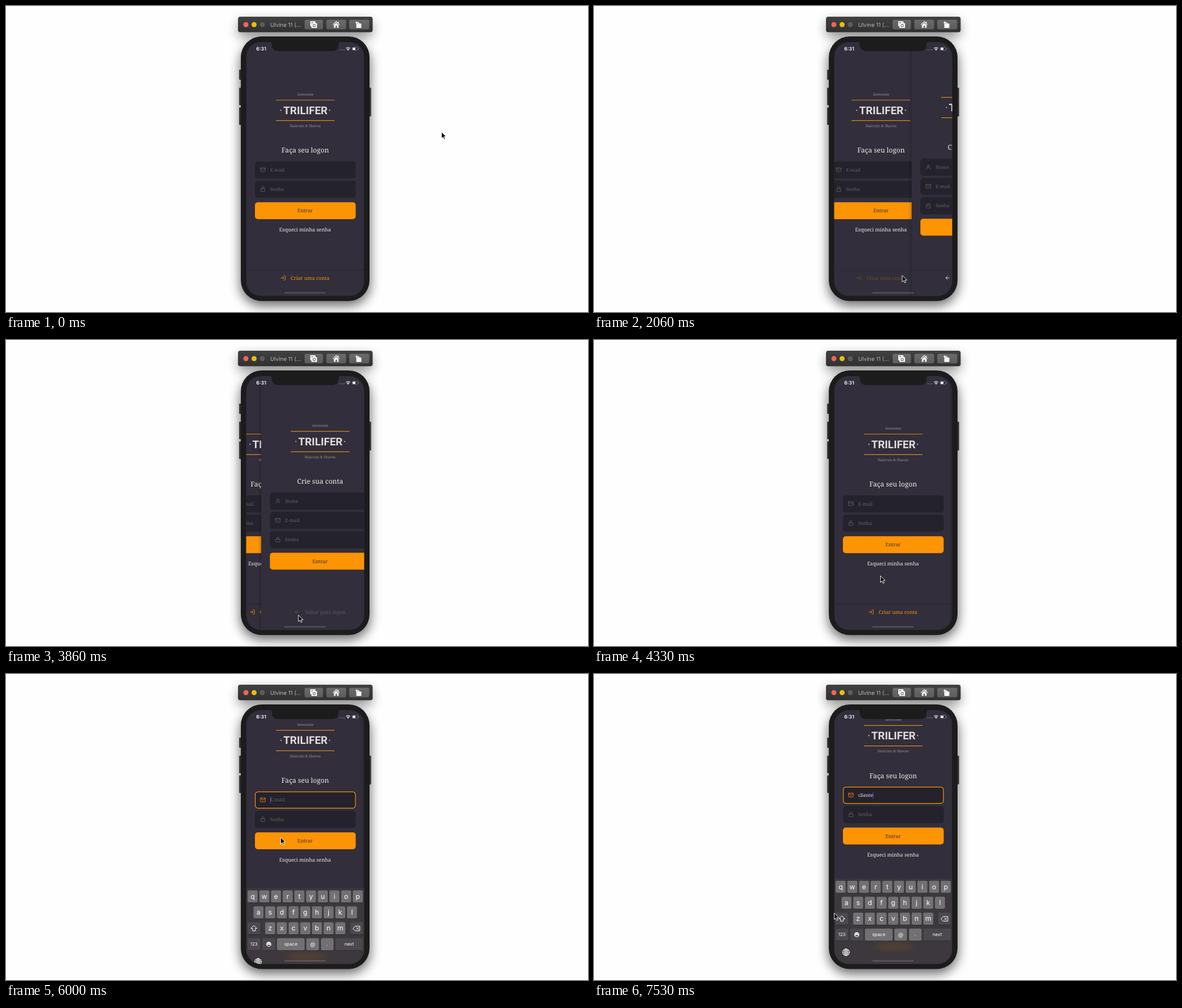
An HTML page for the animation above (8000 ms loop, 1031x543 px).

```html
<!DOCTYPE html>
<html lang="pt-BR">
<head>
<meta charset="utf-8">
<title>App logon</title>
<style>
  html, body { margin: 0; width: 100%; height: 100%; overflow: hidden; background: #fefefe; }
  svg { display: block; width: 1031px; height: 543px; }
  text { text-rendering: geometricPrecision; white-space: pre; }
  .serif { font-family: "Noto Serif", serif; }
  .sans { font-family: Inter, Roboto, sans-serif; }
  .mid { text-anchor: middle; }
  .title { font-size: 12.1px; font-weight: 500; fill: #f4ede8; }
  .tag { font-size: 6.35px; fill: #98949a; }
  .brand { font: 700 19px Roboto, sans-serif; fill: #e2dddb; }
  .hint { font-size: 8.3px; fill: #666360; }
  .typed { font-size: 8.2px; fill: #f4ede8; }
  .action { font-size: 8.7px; font-weight: 500; fill: #312e38; }
  .icon { fill: none; stroke: #666360; stroke-width: 2; stroke-linecap: round; stroke-linejoin: round; }
  .line { fill: none; stroke: #fff; stroke-width: 1; stroke-linejoin: round; stroke-linecap: round; }
  .focus .icon { stroke: #fd9404; }
  .focus .box { stroke: #fd9404; }
  .box { fill: #24222c; stroke: #24222c; stroke-width: 1.2; }
</style>
</head>
<body>
<svg viewBox="0 0 1031 543" xmlns="http://www.w3.org/2000/svg">
  <defs>
    <clipPath id="glass"><rect x="425.5" y="64" width="209" height="450.5" rx="26"/></clipPath>
    <clipPath id="safe"><rect x="425" y="79.5" width="210" height="389"/></clipPath>
    <filter id="soft" x="-30%" y="-30%" width="160%" height="160%"><feGaussianBlur stdDeviation="10"/></filter>
    <filter id="haze" x="-30%" y="-100%" width="160%" height="300%"><feGaussianBlur stdDeviation="6"/></filter>
    <linearGradient id="bar" x2="0" y2="1"><stop stop-color="#414142"/><stop offset="1" stop-color="#303031"/></linearGradient>
    <linearGradient id="btn" x2="0" y2="1"><stop stop-color="#6b6b6c"/><stop offset="1" stop-color="#5c5c5d"/></linearGradient>
    <linearGradient id="edge"><stop stop-opacity="0"/><stop offset="1" stop-opacity=".16"/></linearGradient>
    <g id="mail"><rect x="2" y="4" width="20" height="16" rx="2"/><path d="M22 6 12 13 2 6"/></g>
    <g id="lock"><rect x="3" y="11" width="18" height="11" rx="2"/><path d="M7 11V7a5 5 0 0 1 10 0v4"/></g>
    <g id="user"><path d="M20 21v-2a4 4 0 0 0-4-4H8a4 4 0 0 0-4 4v2"/><circle cx="12" cy="7" r="4"/></g>
    <g id="enter"><path d="M15 3h4a2 2 0 0 1 2 2v14a2 2 0 0 1-2 2h-4M10 17l5-5-5-5M15 12H3"/></g>
    <g id="back"><path d="M19 12H5M12 19l-7-7 7-7"/></g>
  </defs>

  <rect width="1031" height="543" fill="#fefefe"/>
  <g filter="url(#soft)" opacity=".58">
    <rect x="412" y="27" width="236" height="28" rx="4" opacity=".75"/>
    <rect x="415" y="64" width="230" height="468" rx="38"/>
  </g>

  <rect x="411" y="19" width="238.5" height="27.5" rx="4" fill="url(#bar)"/>
  <circle cx="425" cy="33" r="4.5" fill="#fc605b"/>
  <circle cx="439.5" cy="33" r="4.5" fill="#e5c009"/>
  <circle cx="454" cy="33" r="4.5" fill="#5c5c5e"/>
  <text class="sans" x="468" y="36.6" font-size="9.8" fill="#b9b9ba">Ulvine 11 (...</text>
  <g fill="url(#btn)">
    <rect x="529" y="24.5" width="32.5" height="17" rx="3"/>
    <rect x="567.5" y="24.5" width="35" height="17" rx="3"/>
    <rect x="608" y="24.5" width="35.5" height="17" rx="3"/>
  </g>
  <g fill="#f5f5f5">
    <path d="M539 27h9v2h-7v7h-2z"/>
    <path d="M541 30.5h2l1-1.5h4l1 1.5h2V39h-10z"/>
    <circle cx="546" cy="34.7" r="2.6" fill="#646465"/><circle cx="546" cy="34.7" r="1.6"/>
    <path d="M585 26.8 578.6 33l.8.8 5.6-5.4 5.6 5.4.8-.8-2.2-2.1V28h-1.6v1.3z"/>
    <path d="M580.8 33.8 585 29.8l4.2 4V38.800h-3V35h-2.400v3.800h-3z"/>
    <rect x="620.5" y="31" width="9" height="8" rx="1"/>
    <path d="M618.800 29.500 622 26.800v1.800q4.300 0 4.300 3h-1.600q0-1.300-2.700-1.300v1.900z"/>
  </g>

  <g fill="#303031">
    <rect x="413" y="113" width="5" height="18" rx="1"/>
    <rect x="413" y="145" width="5" height="31" rx="1"/>
    <rect x="413" y="180" width="5" height="31" rx="1"/>
    <rect x="642" y="145" width="4.700" height="51" rx="1"/>
  </g>
  <rect x="416" y="54" width="228" height="469.500" rx="37" fill="#1c1c1d"/>

  <g clip-path="url(#glass)">
    <g id="logon"></g>
    <g id="signup"></g>
    <g id="keys"></g>
    <rect x="493" y="507.700" width="73.500" height="2.500" rx="1.250" fill="#97949c" opacity=".32"/>
  </g>

  <path d="M466 63.500q5 0 5 5 0 11.500 12 11.500h94q12 0 12-11.500 0-5 5-5z" fill="#1c1c1d"/>
  <g fill="#fff">
    <text class="sans" x="443.300" y="79" font-size="8.700" font-weight="600">6:31</text>
    <g opacity=".4"><circle cx="591.300" cy="77.700" r=".8"/><circle cx="594" cy="77.700" r=".8"/><circle cx="596.700" cy="77.700" r=".8"/><circle cx="599.400" cy="77.700" r=".8"/></g>
    <path d="M606 79.300l-1.500-1.700q1.500-1.200 3 0z"/>
    <path d="M603.800 76.700q2.200-1.900 4.400 0M602.300 75q3.700-3 7.400 0" fill="none" stroke="#fff" stroke-width="1.150"/>
    <rect x="613.300" y="73.200" width="10" height="5.600" rx="1.600" fill="none" stroke="#fff" stroke-width=".6" opacity=".5"/>
    <rect x="614.200" y="74.100" width="4.800" height="3.800" rx=".8"/>
    <rect x="624" y="75" width=".9" height="2" rx=".4" opacity=".5"/>
  </g>
  <path id="cursor" d="M0 0V11.600L2.700 9.100 4.400 13.100 6.400 12.300 4.700 8.300H8.300Z" fill="#0a0a0a" stroke="#fff" stroke-width=".9" stroke-linejoin="round"/>
</svg>

<script>
const $ = id => document.getElementById(id);
const LOOP = 8000, STEP = 200 / 3;
const WIDTH = 209, KEYBOARD = 152, LIFT = 75.7;
const ORANGE = '#fd9404';

const text = (x, y, cls, str, extra = '') =>
  `<text x="${x}" y="${y}" class="${cls}" ${extra}>${str}</text>`;
const icon = (name, x, y, extra = '') =>
  `<use href="#${name}" class="icon" transform="translate(${x} ${y}) scale(.42)" ${extra}/>`;
const rect = (x, y, w, h, r, extra) =>
  `<rect x="${x}" y="${y}" width="${w}" height="${h}" rx="${r}" ${extra}/>`;

const logo = dy => `<g transform="translate(0 ${dy})">
  ${text(530, 159.2, 'serif mid tag', 'Awesome')}
  <path d="M478 167h104M478 203.300h104" stroke="#d98a1c" stroke-width="1.200"/>
  <circle cx="487" cy="185" r="1.200" fill="#a8a3a6"/><circle cx="573.300" cy="185" r="1.200" fill="#a8a3a6"/>
  ${text(530.5, 191.7, 'brand mid', 'TRILIFER')}
  ${text(530, 215.2, 'serif mid tag', 'Haircuts &amp; Shaves')}</g>`;

const field = (y, name, hint, id = '') => `<g id="${id}">
  ${rect(441.6, y + .6, 177.4, 29, 4.8, 'class="box"')}
  ${icon(name, 450, y + 9.8)}
  ${text(468, y + 18, 'serif hint', hint)}</g>`;

const button = y => rect(441, y, 178.500, 30, 5, `fill="${ORANGE}"`) +
  text(529.8, y + 18.2, 'serif mid action', 'Entrar');

const footer = (id, name, ix, tx, size, color, label) => `<g id="${id}">
  <path d="M425.500 468.500h209" stroke="#24222c" stroke-width=".9"/>
  ${icon(name, ix, 477.5, `style="stroke:${color}"`)}
  ${text(tx, 486.4, 'serif', label, `font-size="${size}" fill="${color}"`)}</g>`;

const backdrop = rect(425.5, 64, WIDTH, 451, 0, 'fill="#322e3b"');

$('logon').innerHTML = backdrop + `<g clip-path="url(#safe)"><g id="form">
  ${logo(0)}
  ${text(530, 260.3, 'serif mid title', 'Faça seu logon')}
  ${field(275.7, 'mail', 'E-mail', 'email')}
  ${field(310, 'lock', 'Senha')}
  <text id="typed" class="serif typed" x="468" y="293.700"></text>
  <rect id="caret" y="285" width="1" height="11.500" fill="#3f5ee6"/>
  ${button(348.2)}
  ${text(529.8, 399.8, 'serif mid', 'Esqueci minha senha', 'font-size="9.050" fill="#f4ede8"')}
  </g></g>` + footer('create', 'enter', 486, 504.3, 8.9, ORANGE, 'Criar uma conta');

$('signup').innerHTML = rect(419.5, 64, 6, 451, 0, 'fill="url(#edge)"') + backdrop +
  logo(-4.9) + text(530, 255.3, 'serif mid title', 'Crie sua conta') +
  field(270.7, 'user', 'Nome') + field(305, 'mail', 'E-mail') + field(339.3, 'lock', 'Senha') +
  button(377.4) +
  footer('return', 'back', 484, 502.7, 8.75, '#f4ede8', 'Voltar para logon');

// Keyboard
const LIGHT = '#717073', DARK = '#4b494e';
const key = (x, y, w, label, size = 12.3, fill = LIGHT, dy = 4.2) =>
  rect(x, y + .8, w, 21.5, 2.5, 'fill="#27252a"') + rect(x, y, w, 21.5, 2.5, `fill="${fill}"`) +
  text(x + w / 2, y + 10.7 + dy, 'sans mid', label, `font-size="${size}" fill="#fff"`);
const row = (letters, x, y) => [...letters].map((c, i) => key(x + i * 20.7, y, 17.8, c)).join('');

$('keys').innerHTML = rect(425.5, 363, WIDTH, KEYBOARD + 2, 0, 'fill="#3c383d"') +
  `<ellipse cx="532" cy="484" rx="36" ry="5" fill="#9a6014" opacity=".35" filter="url(#haze)"/>` +
  row('qwertyuiop', 428, 367) + row('asdfghjkl', 438.4, 395.2) + row('zxcvbnm', 459.1, 423.5) +
  key(428, 423.5, 22.5, '', 8, DARK) + key(609.800, 423.5, 22.7, '', 8, DARK) +
  key(428, 451.7, 22.5, '123', 8, DARK, 2.9) + key(454, 451.7, 23, '', 8, DARK) +
  key(480, 451.7, 49, 'space', 8.2, LIGHT, 2.6) + key(532, 451.7, 22.500, '@', 9.5, LIGHT, 3.2) +
  key(558, 451.7, 22.300, '.', 9.5, LIGHT, 3) + key(583.5, 451.7, 49, 'next', 8.2, DARK, 2.6) +
  `<g class="line">
    <path d="M439.300 429.300l5 5.200h-2.600v4.200h-4.800v-4.200h-2.600z"/>
    <path d="M615 434.500l3.700-4.200h8v8.400h-8zM620.700 432.500l4 4M624.700 432.500l-4 4"/>
    <circle cx="446.500" cy="493.800" r="6"/><ellipse cx="446.500" cy="493.800" rx="2.700" ry="6"/>
    <path d="M440.500 493.800h12M446.500 487.800v12M441.700 490.500q4.800 1.600 9.600 0M441.700 497.100q4.800-1.600 9.600 0"/>
  </g>
  <circle cx="465.500" cy="462.500" r="4.300" fill="#fff"/>
  <path d="M462.700 463.300h5.600q-.4 2.500-2.800 2.500t-2.800-2.500z" fill="${DARK}"/>
  <circle cx="463.900" cy="461.200" r=".7" fill="${DARK}"/><circle cx="467.100" cy="461.200" r=".7" fill="${DARK}"/>`;

// Timeline: ms, x, y of the pointer tip
const PATH = [
  [400, 771.5, 223.5], [533, 735, 290], [667, 672, 392], [733, 653, 400], [800, 644, 383],
  [933, 644, 383], [1200, 616, 405], [1533, 553, 461], [1667, 540, 474], [1800, 546, 478],
  [2867, 546, 478], [3067, 548, 385], [3267, 542, 259], [3533, 519, 491], [3600, 518, 488],
  [4133, 518, 488], [4667, 490, 303], [4867, 486.5, 290],
  [6067, 486.5, 290], [6200, 491.5, 295], [6267, 482, 318], [6533, 425.5, 424]
];
const TYPING = [6860, 7060, 7200, 7260, 7400, 7460, 7530];
const WORD = 'cliente';
const PUSH = 2000, POP = 3833, FOCUS = 5795;

// Critically damped spring: stiffness 1000, mass 3
const spring = ms => {
  if (ms <= 0) return 0;
  const x = Math.sqrt(1000 / 3) * ms / 1000;
  return 1 - (1 + x) * Math.exp(-x);
};

const press = (t, down, up) => {
  if (t < down) return 1;
  const k = Math.min(Math.max((t - up) / 250, 0), 1);
  return .2 + .8 * (k < .5 ? 2 * k * k : 1 - 2 * (1 - k) ** 2);
};

const pointer = t => {
  const i = PATH.findIndex(p => p[0] > t);
  if (i === 0) return PATH[0].slice(1);
  if (i < 0) return PATH[PATH.length - 1].slice(1);
  const [a, b] = [PATH[i - 1], PATH[i]], k = (t - a[0]) / (b[0] - a[0]);
  return [a[1] + (b[1] - a[1]) * k, a[2] + (b[2] - a[2]) * k];
};

const move = (id, x, y) => $(id).setAttribute('transform', `translate(${x.toFixed(3)} ${y.toFixed(3)})`);
const hint = $('email').querySelector('text');

function draw(now) {
  const t = Math.floor((now + 7) / STEP) * STEP;
  const nav = t < POP ? spring(t - PUSH) : 1 - spring(t - POP);
  move('logon', -.3 * WIDTH * nav, 0);
  move('signup', WIDTH * (1 - nav), 0);
  $('signup').style.display = nav > 0 ? '' : 'none';
  $('create').style.opacity = press(t, 1860, PUSH);
  $('return').style.opacity = press(t, 3660, POP);

  const up = spring(t - FOCUS), focused = t > FOCUS;
  move('form', 0, -LIFT * up);
  move('keys', 0, KEYBOARD * (1 - up));
  $('keys').style.display = focused ? '' : 'none';
  $('email').setAttribute('class', focused ? 'focus' : '');

  const count = TYPING.filter(ms => ms <= t).length, typed = $('typed');
  typed.textContent = WORD.slice(0, count);
  hint.style.display = count ? 'none' : '';
  $('caret').style.display = focused ? '' : 'none';
  $('caret').setAttribute('x', 468 + (count ? typed.getComputedTextLength() : 0));

  move('cursor', ...pointer(t));
}

function tick() {
  draw(performance.now() % LOOP);
  requestAnimationFrame(tick);
}
tick();
</script>
</body>
</html>
```
